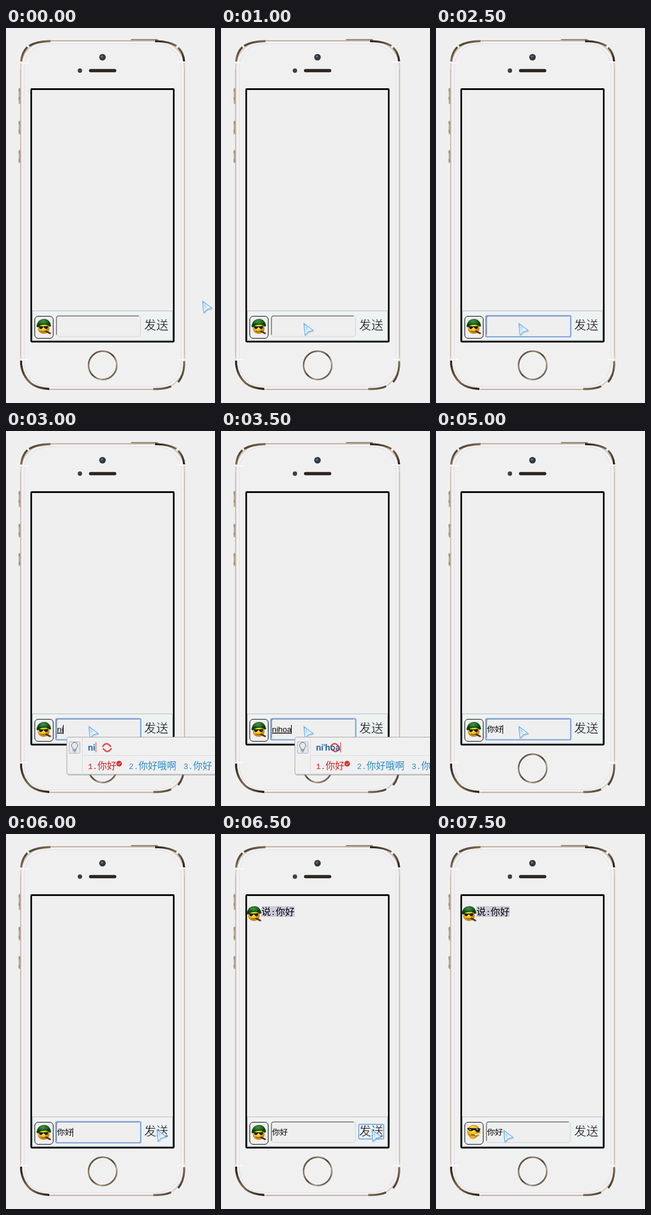
These frames come from a looping animation (352 px wide and 629 px high, 8000 ms). An HTML page:

```html
<!DOCTYPE html>
<html lang="zh">
<head>
<meta charset="utf-8">
<title>Chat demo</title>
<style>
  html, body { margin: 0; width: 100%; height: 100%; overflow: hidden; background: #efefef; }
  svg { display: block; width: 352px; height: 629px; }
  text { font-family: "Noto Sans CJK SC", "Noto Sans CJK", sans-serif; font-weight: 300; }
  .latin { font-family: "Liberation Sans", Arial, sans-serif; font-weight: 400; }
  .composing { text-decoration: underline; }
  .spelling { font-family: Roboto, sans-serif; font-weight: 500; }
  .number { font: 13.333px "Liberation Mono", monospace; }
  .line { fill: none; stroke-linecap: round; }
</style>
</head>
<body>
<svg viewBox="0 0 352 629">
  <defs>
    <linearGradient id="ring" x2="1" y2="1">
      <stop offset="0" stop-color="#30251c"/><stop offset=".3" stop-color="#988773"/>
      <stop offset=".5" stop-color="#4d4034"/><stop offset=".7" stop-color="#b5a593"/>
      <stop offset="1" stop-color="#30251c"/>
    </linearGradient>
    <linearGradient id="metal" x2="1" y2="1">
      <stop offset="0" stop-color="#251d16"/><stop offset=".5" stop-color="#846f54"/>
      <stop offset="1" stop-color="#251d16"/>
    </linearGradient>
    <linearGradient id="arrow" x2="1" y2="1">
      <stop offset="0" stop-color="#68b0ed"/><stop offset=".55" stop-color="#e4f5ff"/>
      <stop offset="1" stop-color="#8bc5f2"/>
    </linearGradient>
    <radialGradient id="skin" cx=".4" cy=".35">
      <stop offset="0" stop-color="#fff27a"/><stop offset=".6" stop-color="#f6c71c"/>
      <stop offset="1" stop-color="#d08a10"/>
    </radialGradient>
    <radialGradient id="green" cx=".45" cy=".3">
      <stop offset="0" stop-color="#459a43"/><stop offset="1" stop-color="#06400f"/>
    </radialGradient>
    <symbol id="soldier" viewBox="0 0 26 27">
      <ellipse cx="12.5" cy="17.500" rx="9.500" ry="8" fill="url(#skin)" stroke="#a87510" stroke-width=".6"/>
      <path d="M4 13l8 .5 8-.5-1 4q-4 2.500-6-2h-1.500q-2 4.500-6 2z" fill="#17200f"/>
      <path d="M.5 12Q3 1 13 1q10 0 12 12l-3 1Q18 9 12 11 6 11 3 15 0 15 .5 12z" fill="url(#green)"/>
      <path d="M8 21.500q4 2 8 0" class="line" stroke="#754708"/>
      <path d="M17 22l6 3" class="line" stroke="#51301b" stroke-width="3"/>
      <circle cx="24" cy="25" r="1.100" fill="#d0461c"/>
    </symbol>
    <symbol id="cool" viewBox="0 0 26 27">
      <circle cx="12.500" cy="12" r="10.700" fill="url(#skin)" stroke="#b87912" stroke-width=".6"/>
      <path d="M1 6l23 1-2 5q-5 3-7-2l-3-.5q-4 4-8 0z" fill="#14120f"/>
      <path d="M5 8l3 1M17 8l3 1" class="line" stroke="#fff"/>
      <path d="M9 17q4 2 8-1" class="line" stroke="#6b3b07" stroke-width="1.300"/>
      <path d="M15 17l7-1" class="line" stroke="#f7f3e5" stroke-width="2"/>
      <path d="M6 22q2-5 7-3l3 3q-4 4-10 0z" fill="#eeb31c" stroke="#a96c10" stroke-width=".7"/>
    </symbol>
  </defs>

  <rect width="352" height="629" fill="#efefef"/>

  <!-- Phone body -->
  <g class="line">
    <rect x="25" y="21.500" width="275.500" height="584.500" rx="45" fill="#f0f0f0" stroke="#d6cec2" stroke-width="2.500"/>
    <rect x="27.500" y="24" width="270.500" height="580" rx="43" stroke="#f5f2f6" stroke-width="2.500"/>
    <rect x="30.500" y="26.500" width="264.500" height="575" rx="40" stroke="#e2dfe4"/>
    <path d="M75 21.500H250M75 606H250" stroke="#aa9d8b"/>
    <path d="M24.500 70V550M300.500 70V550" stroke="#c4b8a3"/>
    <g stroke="url(#metal)" stroke-width="3.400" stroke-linecap="butt">
      <path d="M25.500 56Q27 41 36 32M39 30Q51 22.500 75 22"/>
      <path d="M251 22Q275 22.500 287 30M290 33Q299 42 300 56"/>
      <path d="M25.500 558V564Q28 584 42 596 52 604 73 605.500"/>
      <path d="M300 559V566Q299 583 290 594M278 601Q267 606 248 605.500"/>
    </g>
    <path d="M25 58.500H38M289 57H301M25 556H37M289 556H301" stroke="#fafafa" stroke-width="2"/>
    <path d="M211 19.500H255" stroke="#75634d" stroke-width="1.500"/>
    <path d="M23 102V126M23 157V177M23 206V225" stroke="#b6a58a" stroke-width="3"/>
    <path d="M22 102V126M22 157V177M22 206V225" stroke="#7d7263" stroke-dasharray="4 10"/>
    <path d="M142.500 71.500H183" stroke="#2d2420" stroke-width="5.500"/>
    <circle cx="162.800" cy="565.800" r="23.700" stroke="url(#ring)" stroke-width="2.800"/>
    <circle cx="162.800" cy="565.800" r="21.700" stroke="#faf8f5"/>
  </g>
  <circle cx="162.500" cy="49" r="5.500" fill="#303940"/>
  <circle cx="161.500" cy="48" r="2" fill="#587080"/>
  <circle cx="124.500" cy="71.500" r="3.700" fill="#443e3c"/>

  <!-- Screen -->
  <rect x="42.500" y="102.500" width="240" height="423.500" rx="1" fill="#efefef" stroke="#0b0b0c" stroke-width="2.800"/>
  <rect x="44.500" y="474.500" width="236" height="49.500" fill="#eff2f3" stroke="#b4c1c5"/>
  <rect x="48.500" y="483.500" width="31" height="37" rx="5.500" fill="#efefef" stroke="#111"/>
  <use id="avatar" href="#soldier" x="51" y="487" width="26" height="27"/>

  <rect x="85" y="483" width="141.500" height="34.500" rx="4" fill="#efefef" stroke="#dcdcdc" stroke-width="1.500"/>
  <path d="M85 514V487q0-4 4-4H223" class="line" stroke="#777" stroke-width="1.500"/>
  <rect id="inputFocus" x="84" y="482.500" width="143" height="35.500" rx="2" fill="none" stroke="#7fa6de" stroke-width="2.200"/>
  <text id="typed" class="latin" x="86" y="505" font-size="13.333"></text>
  <path id="caret" stroke="#000"/>

  <text x="232.500" y="506" font-size="20.500" stroke="#eff2f3" stroke-width=".5">发送</text>
  <rect id="sendFocus" x="232" y="487" width="42" height="24.500" rx="2" fill="none" stroke="#83afe9" stroke-width="1.800"/>

  <g id="message">
    <rect x="68" y="121" width="56" height="18" fill="#cdcbd9"/>
    <use href="#soldier" x="43" y="120" width="26" height="27"/>
    <text y="136" font-size="16"><tspan x="68">说</tspan><tspan x="84" class="number">:</tspan><tspan x="92">你好</tspan></text>
  </g>

  <g id="pointer" stroke-linejoin="round">
    <path d="M2 3L18 14 10 16 4 22z" fill="#78879a" opacity=".25"/>
    <path d="M.5 0L16.500 12 8 14 2.500 20z" fill="url(#arrow)" stroke="#77b4ea" stroke-width="1.300"/>
    <path d="M2.500 3.500L13 11.300 7.500 12.500 3.700 16.500z" fill="none" stroke="#f4fbff"/>
  </g>

  <!-- Input method panel, drawn from its own top left corner -->
  <g id="panel">
    <rect x="1" y="2" width="330" height="63" rx="4" fill="#777" opacity=".3"/>
    <rect x=".5" y=".5" width="330" height="62.500" rx="3" fill="#f0f0f0" stroke="#a9a9ad"/>
    <path d="M26.500 1V63" stroke="#e4d9dc"/>
    <path d="M27 31.500H330" stroke="#dcdce0"/>
    <rect x="4.500" y="8.500" width="18" height="19" rx="1" fill="#e3e8f0" stroke="#a9b8ca"/>
    <path d="M11 21q0-2-1.500-3.500a5 5 0 1 1 8 0Q16 19 16 21zM11 23h5M12 25h3" class="line" stroke="#686c72"/>
    <g class="line" stroke="#e64b4b" stroke-width="2.500">
      <path d="M61 16q6-9 13 0M75 20q-6 9-13 0"/>
    </g>
    <text id="spelling" class="spelling" x="36" y="23" font-size="15.500" fill="#195a9e"></text>
    <path id="spellingCaret" stroke="#e33"/>
    <g font-size="16" fill="#2b8bc5">
      <text y="54" fill="#d8201f"><tspan x="36" class="number">1.</tspan><tspan x="52">你好</tspan></text>
      <text y="54"><tspan x="105" class="number">2.</tspan><tspan x="121">你好哦啊</tspan></text>
      <text y="54"><tspan x="197" class="number">3.</tspan><tspan x="213">你好</tspan></text>
    </g>
    <circle cx="88.500" cy="45" r="4.700" fill="#d52b2b"/>
    <path d="M86.500 45l1.500 1.500 3-3" class="line" stroke="#fff"/>
  </g>
</svg>

<script>
  const LOOP = 8000;
  const $ = id => document.getElementById(id);
  const show = (id, on) => $(id).setAttribute("visibility", on ? "visible" : "hidden");
  const during = (t, from, to) => t >= from && t < to;

  // Each track lists [start time, value]; values hold until the next entry.
  const pointerTrack = [
    [0, [330.5, 458]], [500, [69, 505]], [1000, [139, 495.5]],
    [5500, [296, 573]], [6000, [253.5, 496]], [7000, [80, 492]], [7500, [113.5, 497]]
  ];
  const textTrack = [[0, ""], [3000, "ni"], [3500, "nihoa"], [4000, "你好"]];
  const spellingTrack = [[0, "ni"], [3500, "ni'hoa"]];
  const caretTrack = [[0, false], [1500, true], [2500, false], [3000, true],
    [4500, false], [5000, true], [5500, false], [6000, true], [6500, false]];
  const valueAt = (track, t) => track.filter(([start]) => start <= t).pop()[1];

  function setText(id, text) {
    const node = $(id);
    if (node.textContent !== text) node.textContent = text;
    return text ? node.getComputedTextLength() : 0;
  }

  function draw(t) {
    const composing = during(t, 3000, 4000);
    const [x, y] = valueAt(pointerTrack, t);
    $("pointer").setAttribute("transform", `translate(${x} ${y})`);

    const caretX = Math.floor(86 + setText("typed", valueAt(textTrack, t))) + .5;
    $("typed").classList.toggle("composing", composing);
    $("caret").setAttribute("d", `M${caretX} 493V508`);
    show("caret", valueAt(caretTrack, t));
    show("inputFocus", during(t, 1500, 6500));
    show("sendFocus", during(t, 6500, 7500));
    show("message", t >= 6500);
    $("avatar").setAttribute("href", t >= 7500 ? "#cool" : "#soldier");

    show("panel", composing);
    $("panel").setAttribute("transform", `translate(${t < 3500 ? 102 : 124} 513)`);
    const spellingEnd = 36.5 + setText("spelling", valueAt(spellingTrack, t));
    $("spellingCaret").setAttribute("d", `M${Math.floor(spellingEnd) + .5} 9V26`);
  }

  const start = performance.now();
  function tick() {
    draw((performance.now() - start) % LOOP);
    requestAnimationFrame(tick);
  }
  tick();
</script>
</body>
</html>
```
